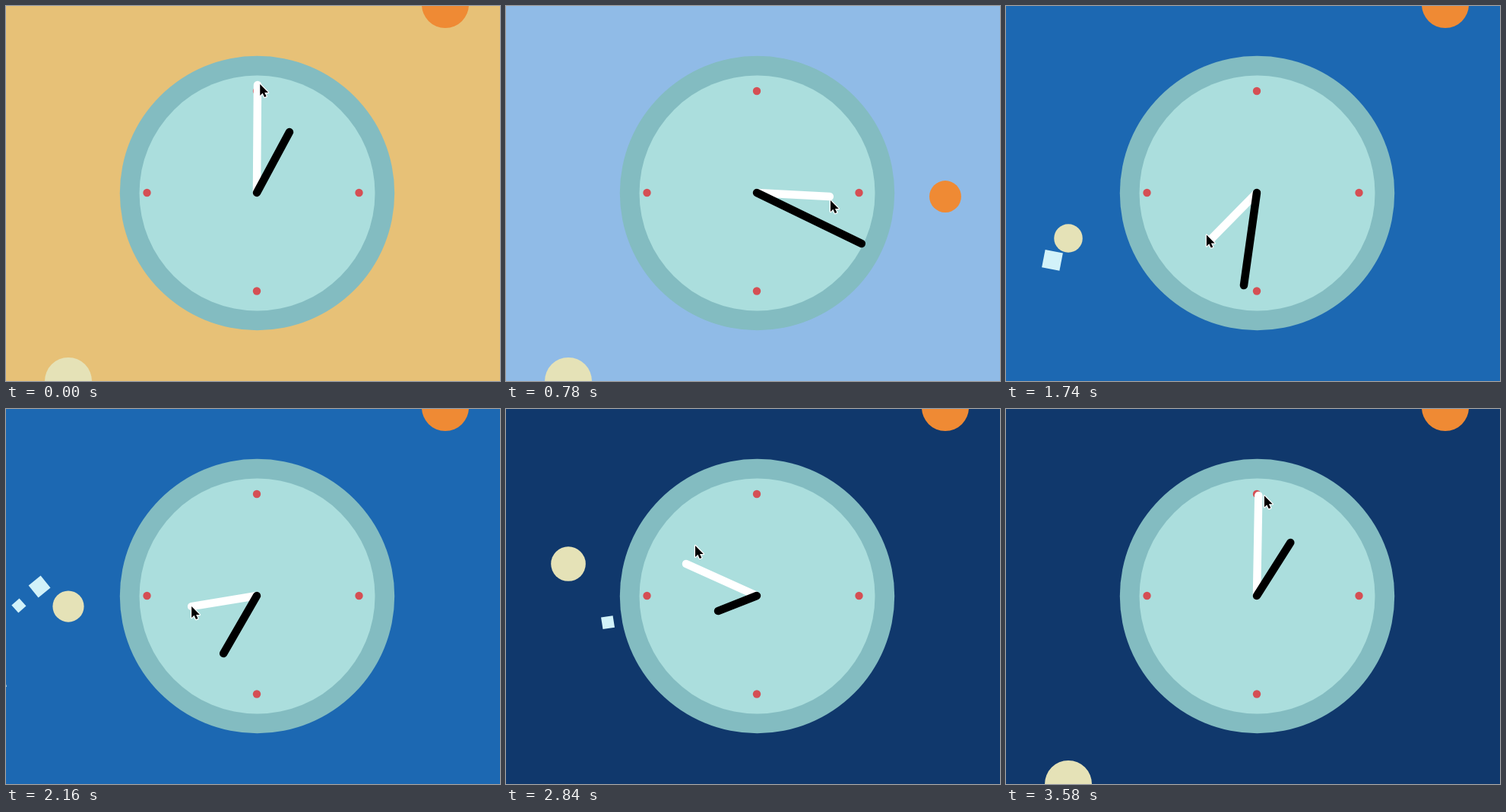
An HTML page with a canvas that plays this animation: 650 px wide and 494 px high, repeating every 3.6 s.

```html
<!DOCTYPE html>
<html lang="en">
<head>
<meta charset="utf-8">
<title>Day and night clock</title>
<style>
  html, body { margin: 0; width: 100%; height: 100%; overflow: hidden; }
  canvas { display: block; }
</style>
</head>
<body>
<canvas id="stage" width="650" height="494"></canvas>
<script>
const ctx = document.getElementById('stage').getContext('2d');
const LOOP = 3600, STEP = 20, EASE_LAG = 60;
const PIVOT = { x: 330, y: 246 };
const HOUR_OFFSET = { x: 42, y: 62 };
const DEAD_ZONE = 4;
const SKY = [[90, '#e7c177'], [182.7, '#90bbe7'], [270, '#1c68b2'], [Infinity, '#10386c']];

// The pointer leads the white hand by some degrees and pixels.
const keys = [
  { t: 0, angle: 0.4, radius: 142, lead: 1.3, reach: 1 },
  { t: 360, angle: 34.8, radius: 119, lead: 8, reach: -7 },
  { t: 780, angle: 93, radius: 96, lead: 2.9, reach: 1.5 },
  { t: 1460, angle: 181.3, radius: 85, lead: 9.1, reach: 3.5 },
  { t: 2160, angle: 260.7, radius: 87, lead: 0, reach: 0 },
  { t: 2840, angle: 294.3, radius: 102, lead: 14.9, reach: 2.5 },
  { t: 3580, angle: 361, radius: 132, lead: 3.3, reach: 0 }
];

const sparks = [
  { born: 1600, y: 325, vx: -0.15, vy: 0.07, size: 30, turn: -100 },
  { born: 1850, y: 285, vx: -0.21, vy: -0.084, size: 27.5, turn: -88 },
  { born: 1920, y: 276, vx: -0.158, vy: -0.175, size: 31.3, turn: -75 },
  { born: 2500, y: 258, vx: 0.153, vy: 0.068, size: 31, turn: -60 }
];

const mix = (a, b, u) => a + (b - a) * u;

function hermite(a, b, slopeA, slopeB, span, u) {
  const v = 1 - u;
  return a * v * v * (1 + 2 * u) + b * u * u * (3 - 2 * u) +
    span * u * v * (slopeA * v - slopeB * u);
}

function polar(angle, radius) {
  const a = angle * Math.PI / 180;
  return { x: PIVOT.x + radius * Math.sin(a), y: PIVOT.y - radius * Math.cos(a) };
}

function radiusSlope(i) {
  const a = keys[Math.max(0, i - 1)], b = keys[Math.min(keys.length - 1, i + 1)];
  return (b.radius - a.radius) / (b.t - a.t);
}

function poseAt(t) {
  let i = 0;
  while (i < keys.length - 2 && t >= keys[i + 1].t) i++;
  const a = keys[i], b = keys[i + 1], span = b.t - a.t;
  const u = Math.min(1, (t - a.t) / span);
  const limit = 3 * (b.angle - a.angle) / span;
  const slope = k => Math.min(limit, k.lead / EASE_LAG);
  const angle = hermite(a.angle, b.angle, slope(a), slope(b), span, u);
  const radius = hermite(a.radius, b.radius, radiusSlope(i), radiusSlope(i + 1), span, u);
  return {
    angle,
    tip: polar(angle, radius),
    pointer: polar(angle + mix(a.lead, b.lead, u), radius + mix(a.reach, b.reach, u))
  };
}

function disc(x, y, r, color) {
  ctx.fillStyle = color;
  ctx.beginPath();
  ctx.arc(x, y, r, 0, Math.PI * 2);
  ctx.fill();
}

function hand(x, y, color) {
  ctx.strokeStyle = color;
  ctx.lineWidth = 10.5;
  ctx.lineCap = 'round';
  ctx.beginPath();
  ctx.moveTo(PIVOT.x, PIVOT.y);
  ctx.lineTo(x, y);
  ctx.stroke();
}

function drawSpark(s, t) {
  const age = t - s.born, size = s.size - 0.045 * age;
  if (age < 0 || size <= 0) return;
  ctx.save();
  ctx.translate(82 + s.vx * age, s.y + s.vy * age);
  ctx.rotate((s.turn + 0.15 * age) * Math.PI / 180);
  ctx.fillStyle = '#d2f2f9';
  ctx.fillRect(-size / 2, -size / 2, size, size);
  ctx.restore();
}

function drawOrb(x, restY, active, y, color) {
  if (active) disc(x, y, 31 - 0.04 * y, color);
  else disc(x, restY, 31, color);
}

function drawFace() {
  disc(330.5, 246.5, 180.7, '#83bcc1');
  disc(330.5, 246.5, 155, '#abdedd');
  for (const [x, y] of [[330, 112], [464.5, 246], [330, 375.5], [185.5, 246]])
    disc(x, y, 5.2, '#d54f54');
}

function drawPointer({ x, y }) {
  ctx.save();
  ctx.translate(x, y);
  ctx.beginPath();
  for (const [px, py] of [[0, 0], [0, 15], [3.4, 11.8], [5.8, 17], [8.4, 16], [6, 11], [10.8, 11]])
    ctx.lineTo(px, py);
  ctx.closePath();
  ctx.lineJoin = 'round';
  ctx.lineWidth = 2.4;
  ctx.strokeStyle = '#fff';
  ctx.stroke();
  ctx.fillStyle = '#000';
  ctx.fill();
  ctx.restore();
}

function draw(t) {
  const { angle, tip, pointer } = poseAt(t);
  const side = tip.x - PIVOT.x;
  ctx.fillStyle = SKY.find(([end]) => angle < end)[1];
  ctx.fillRect(0, 0, 650, 494);
  sparks.forEach(s => drawSpark(s, t));
  drawOrb(578, -2, side > DEAD_ZONE, tip.y, '#ef8a34');
  drawOrb(82, 494, side < -DEAD_ZONE, tip.y, '#e5e2b7');
  drawFace();
  hand(tip.x, tip.y, '#fff');
  hand(tip.x + HOUR_OFFSET.x, tip.y + HOUR_OFFSET.y, '#000');
  drawPointer(pointer);
}

const start = performance.now();
function tick() {
  const t = (performance.now() - start) % LOOP;
  draw(Math.floor(t / STEP) * STEP);
  requestAnimationFrame(tick);
}
tick();
</script>
</body>
</html>
```
